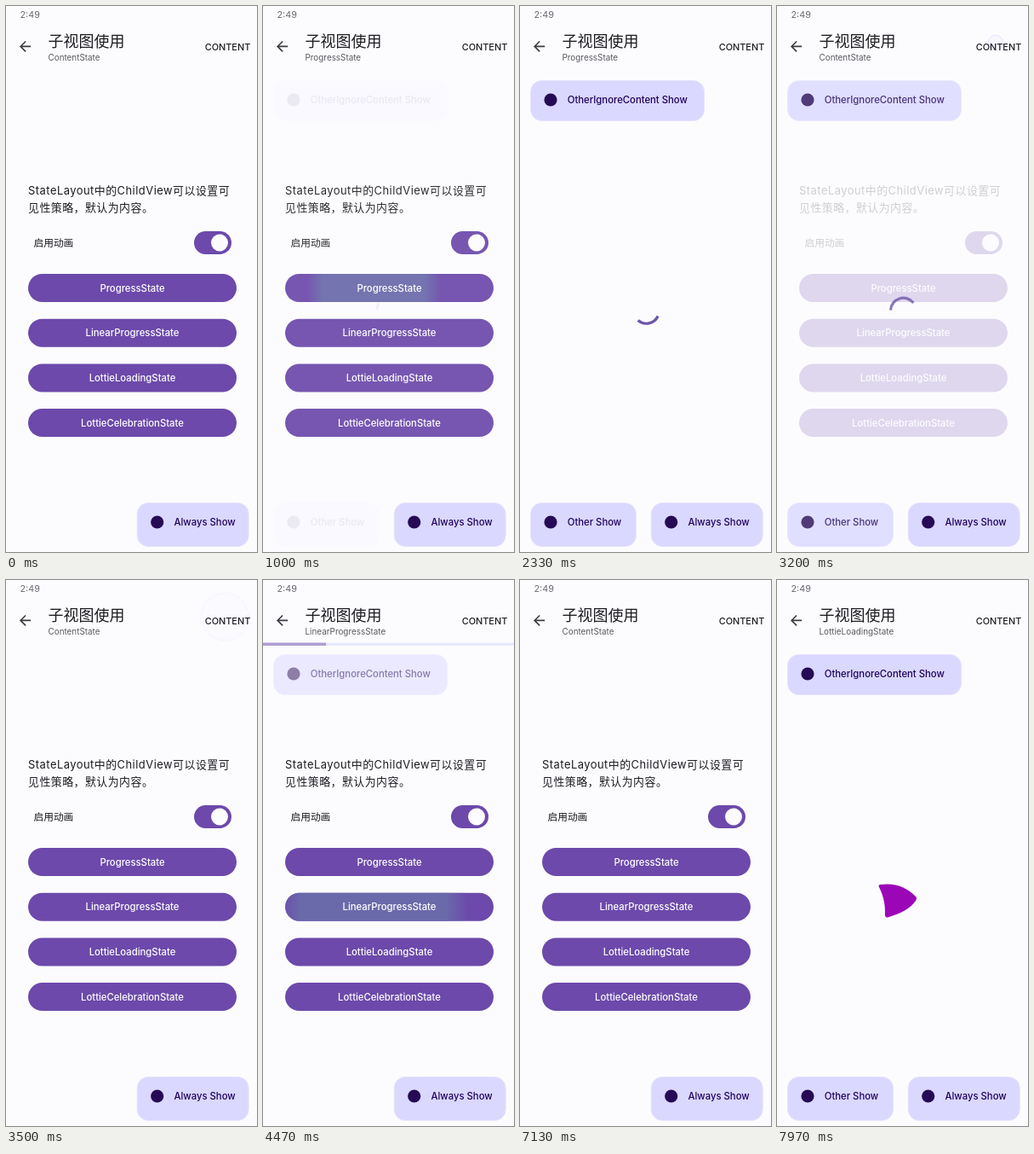
These frames come from a looping animation (295 by 640 pixels, 8000 ms). An HTML page:

```html
<!DOCTYPE html>
<html lang="zh-CN">
<head>
<meta charset="utf-8">
<title>StateLayout</title>
<style>
html, body { margin: 0; width: 100%; height: 100%; overflow: hidden; background: #fcfcff; }
svg { display: block; width: 100vw; height: 100vh; }
text { font-family: Inter, "Noto Sans CJK SC", "Noto Sans CJK", sans-serif; fill: #1d1b20; }
.label { font-size: 11.3px; font-weight: 500; }
.small { font-size: 9.9px; fill: #5a585f; }
.clock { font-size: 10.8px; fill: #6c6a72; }
.menu { font-size: 10.9px; font-weight: 500; }
.body { font-size: 12.9px; letter-spacing: .5px; }
.button text { fill: #fff; text-anchor: middle; }
.chip text { fill: #21005d; }
</style>
</head>
<body>
<svg viewBox="0 0 295 640">
  <defs>
    <radialGradient id="press">
      <stop offset=".76" stop-color="#6a6aaa"/>
      <stop offset="1" stop-color="#6a6aaa" stop-opacity="0"/>
    </radialGradient>
  </defs>
  <rect width="295" height="640" fill="#fcfcff"/>
  <text x="16.5" y="14" class="clock">2:49</text>
  <path transform="translate(12.7 37.6) scale(.82)" fill="#3c3a42"
    d="M20 11H7.83l5.59-5.59L12 4l-8 8 8 8 1.41-1.41L7.83 13H20z"/>
  <text x="49.5" y="47.6" font-size="18">子视图使用</text>
  <text id="subtitle" x="49.5" y="63.5" class="small"></text>
  <circle id="menuRipple" cx="257" cy="43" fill="#f8f7ff" stroke="#e4e2ff"/>
  <text x="233.7" y="52" class="menu">CONTENT</text>

  <g id="content">
    <text x="26" y="220.5" class="body">StateLayout中的ChildView可以设置可</text>
    <text x="26" y="240.7" class="body">见性策略，默认为内容。</text>
    <text x="32.5" y="281.8" font-size="11.7">启用动画</text>
    <rect x="221" y="264" width="44" height="27" rx="13.5" fill="#6c49aa"/>
    <circle cx="251" cy="277.5" r="10" fill="#fcfcff"/>
    <g id="buttons"></g>
  </g>
  <g id="linear">
    <rect y="73.5" width="295" height="3.5" fill="#d8d8ff"/>
    <rect id="bar1" y="73.5" height="3.5" fill="#6c49aa"/>
    <rect id="bar2" y="73.5" height="3.5" fill="#6c49aa"/>
  </g>
  <path id="arc" fill="none" stroke="#6c55a8" stroke-width="3.2"/>
  <path id="lottie" fill="#9b06b6"
    d="M120 360Q118.500 357 122 357C139 354.500 154 361 163 371Q165 373 163 376C157 385 145 391 131 395.300Q127 396.500 127 392C127.500 380 125 370 120 360Z"/>
  <g id="chips"></g>
</svg>
<script>
const LOOP = 8000, FADE = 260;
const $ = id => document.getElementById(id);

const chip = (id, x, y, w, h, label) => `
  <g id="${id}" class="chip">
    <rect x="${x + .5}" y="${y + .5}" width="${w - 1}" height="${h - 1}" rx="13" fill="#dad8ff" stroke="#e6e2ff"/>
    <circle cx="${x + 24}" cy="${y + 23}" r="7.6" fill="#260a56"/>
    <text x="${x + 43.8}" y="${y + 27.2}" class="label">${label}</text>
  </g>`;

$('chips').innerHTML =
  chip('ignoreChip', 12, 87, 205, 48, 'OtherIgnoreContent Show') +
  chip('otherChip', 12, 582, 125, 52, 'Other Show') +
  chip('alwaysChip', 153.7, 582, 132, 52, 'Always Show');

const names = ['ProgressState', 'LinearProgressState', 'LottieLoadingState', 'LottieCelebrationState'];
$('buttons').innerHTML = names.map((name, i) => {
  const y = 314 + i * 52.7;
  const box = `<rect x="26" y="${y}" width="245" height="33" rx="16.5"`;
  return `<g class="button">
    <clipPath id="clip${i}">${box}/></clipPath>
    ${box} fill="#6c49aa"/>
    <g clip-path="url(#clip${i})"><circle id="ripple${i}" cx="130" cy="${y + 17}" fill="url(#press)"/></g>
    <text x="148.5" y="${y + 20.6}" class="label">${name}</text>
  </g>`;
}).join('');

const states = [
  { at: 0, name: 'ContentState' },
  { at: 960, name: 'ProgressState' },
  { at: 3140, name: 'ContentState' },
  { at: 4378, name: 'LinearProgressState' },
  { at: 6250, name: 'ContentState' },
  { at: 7600, name: 'LottieLoadingState' }
];

const clamp = v => Math.max(0, Math.min(1, v));
const mod = (a, b) => ((a % b) + b) % b;

function bezier(x1, y1, x2, y2) {
  const at = (a, b, s) => 3 * a * s * (1 - s) ** 2 + 3 * b * s * s * (1 - s) + s ** 3;
  return x => {
    x = clamp(x);
    if (x === 0 || x === 1) return x;
    let lo = 0, hi = 1;
    for (let i = 0; i < 24; i++) {
      const mid = (lo + hi) / 2;
      if (at(x1, x2, mid) < x) lo = mid; else hi = mid;
    }
    return at(y1, y2, lo);
  };
}
const standard = bezier(.4, 0, .2, 1);
const head1 = bezier(.2, 0, .8, 1);
const tail1 = bezier(.4, 0, 1, 1);
const head2 = bezier(.1, 0, .45, 1);

function show(id, alpha) {
  $(id).setAttribute('opacity', alpha);
  $(id).style.display = alpha > 0 ? '' : 'none';
}

function drawArc(t) {
  const cycle = Math.floor(t / 1332), p = mod(t, 1332);
  const tail = 290 * standard((p - 666) / 666);
  const sweep = Math.max(.1, 290 * standard(p / 666) - tail);
  const start = -90 + cycle * 216 + 286 * p / 1332 + tail;
  const point = deg => {
    const a = deg * Math.PI / 180;
    return `${148.5 + 15 * Math.cos(a)} ${357.2 + 15 * Math.sin(a)}`;
  };
  $('arc').setAttribute('d', `M${point(start)}A15 15 0 ${sweep > 180 ? 1 : 0} 1 ${point(start + sweep)}`);
}

function drawBars(t) {
  t = mod(t, 1800);
  const bar = (id, tail, head) => {
    $(id).setAttribute('x', 295 * tail);
    $(id).setAttribute('width', 295 * Math.max(0, head - tail));
  };
  bar('bar1', tail1((t - 333) / 850), head1(t / 750));
  bar('bar2', tail1((t - 1267) / 533), head2((t - 1000) / 567));
}

function ripple(id, age, size) {
  $(id).setAttribute('r', size * clamp(age / 290));
  show(id, age > 0 ? 1 - clamp((age - 290) / 150) : 0);
}

function render(t) {
  const index = states.findLastIndex(s => t >= s.at);
  const now = states[index], before = states[Math.max(0, index - 1)];
  const k = index ? standard((t - now.at) / FADE) : 1;
  const alpha = (...list) =>
    (list.includes(now.name) ? k : 0) + (list.includes(before.name) ? 1 - k : 0);

  $('subtitle').textContent = now.name;
  show('content', alpha('ContentState', 'LinearProgressState'));
  show('ignoreChip', alpha('ProgressState', 'LinearProgressState', 'LottieLoadingState'));
  show('otherChip', alpha('ProgressState', 'LottieLoadingState'));
  show('arc', alpha('ProgressState'));
  show('linear', alpha('LinearProgressState'));
  show('lottie', alpha('LottieLoadingState'));

  drawArc(286 + (t - 1230) * 2.341);
  drawBars(221 + (t - 4470) * 1.65);
  $('lottie').setAttribute('transform', `rotate(${(t - 7970) * .15} 149 358)`);

  ripple('ripple0', t - 880, 190);
  ripple('ripple1', t - 4300, 190);
  ripple('ripple2', t - 7530, 190);
  ripple('menuRipple', t > 6000 ? t - 6200 : t - 3110, 28);
}

const origin = performance.now();
function tick() {
  render((performance.now() - origin) % LOOP);
  requestAnimationFrame(tick);
}
tick();
</script>
</body>
</html>
```
